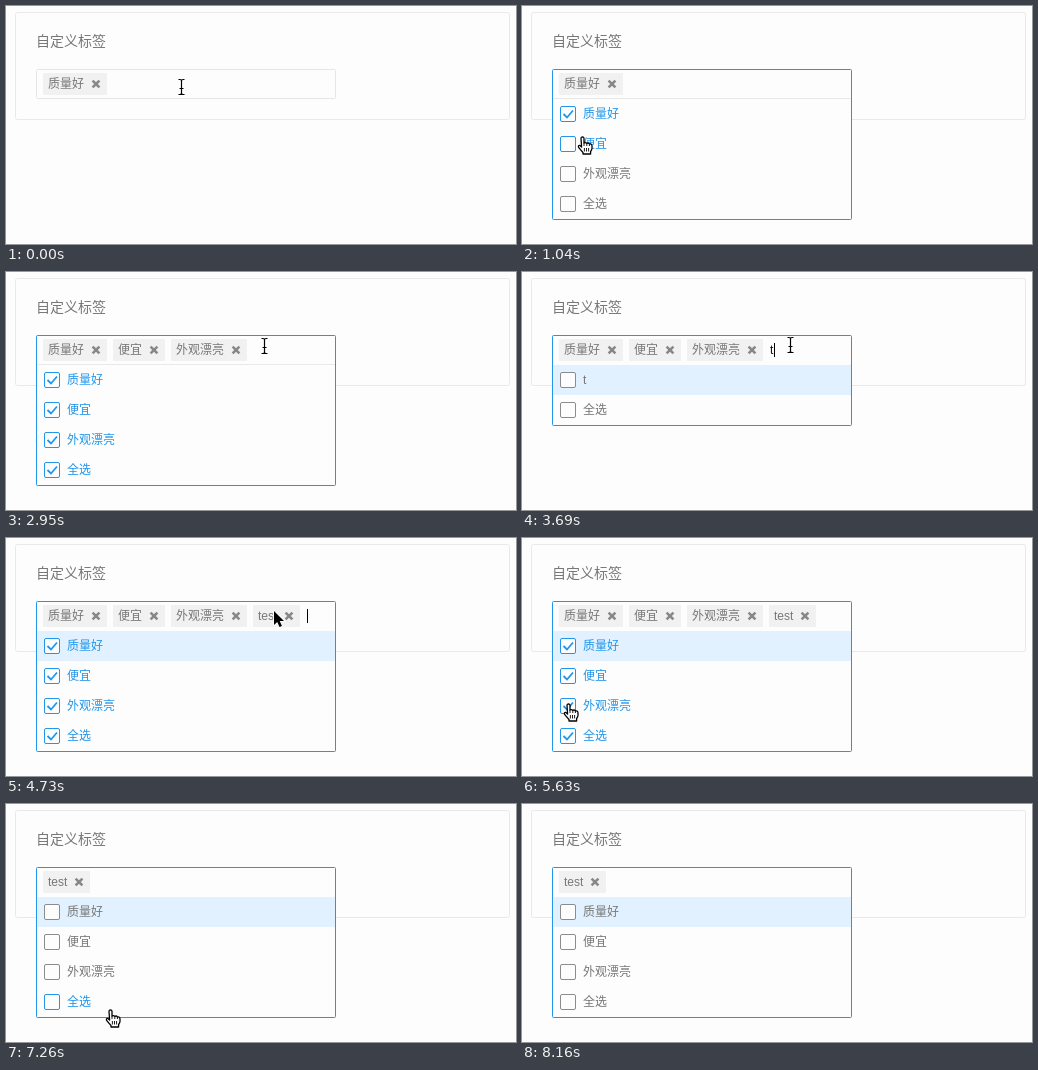
Recreate the animation shown at these times as an HTML page with a canvas. Size 510 by 238 pixels, loop 8460 ms.

```html
<!DOCTYPE html>
<html lang="zh">
<head>
<meta charset="utf-8">
<title>自定义标签</title>
<style>
  html, body { margin: 0; width: 100%; height: 100%; overflow: hidden; background: #fdfdfd; }
  canvas { display: block; }
</style>
</head>
<body>
<canvas id="stage" width="510" height="238"></canvas>
<script>
const ctx = document.getElementById('stage').getContext('2d');
const LOOP = 8460;
const BLUE = '#2196ea', GREY = '#777', PAGE = '#fdfdfd';
const FAMILY = '"Liberation Sans", "Noto Sans CJK SC", "Noto Sans CJK", sans-serif';
const OPTIONS = ['质量好', '便宜', '外观漂亮'];
const ALL = '全选';

// Each track holds [time, ...values]; a value stays until the next entry.
const CURSOR = [
  [0, 'beam', 175, 81],
  [600, 'hand', 152, 97], [740, 'hand', 112, 114], [890, 'hand', 76, 127],
  [1040, 'hand', 61, 131], [1180, 'hand', 54, 133], [1330, 'hand', 52, 134],
  [1780, 'hand', 54, 146], [1930, 'hand', 58, 162], [2070, 'hand', 60, 169],
  [2220, 'hand', 56, 169], [2370, 'hand', 68, 158], [2520, 'hand', 150, 115],
  [2660, 'beam', 244, 76], [2810, 'beam', 258, 74], [2960, 'beam', 265, 73],
  [3100, 'beam', 268, 73],
  [4730, 'arrow', 268, 73],
  [5330, 'hand', 180, 112], [5480, 'hand', 85, 148], [5630, 'hand', 47, 166],
  [5780, 'hand', 42, 182], [5930, 'hand', 41, 194], [6070, 'hand', 43, 198],
  [6220, 'hand', 44, 197],
  [6970, 'hand', 58, 199], [7120, 'hand', 105, 206], [7270, 'arrow', 190, 216],
  [7420, 'arrow', 280, 222], [7560, 'arrow', 360, 227], [7710, 'arrow', 420, 231],
  [7860, 'arrow', 452, 235], [8010, 'none', 0, 0]
];
const TAGS = [
  [0, ['质量好']],
  [1630, ['质量好', '便宜']],
  [2220, OPTIONS],
  [4730, [...OPTIONS, 'test']],
  [6670, ['test']]
];
const TYPED = [[0, ''], [3690, 't'], [3840, 'te'], [3990, 'tes'], [4280, 'test'], [4730, '']];
const CARET = [
  [0, false], [450, true], [890, false], [1330, true], [2070, false], [2220, true],
  [2810, false], [3250, true], [5330, false], [5780, true], [6220, false],
  [6670, true], [7120, false], [7710, true], [8160, false]
];

const HAND = new Path2D('M-2 1.5Q-2 0 -.5 0Q1 0 1 1.5V6Q2.6 5 3.8 6.4Q5.4 5.4 6.4 7Q9 6.4 9 9V11.5Q8.8 13 7.6 14.5V17H0V15.5Q-1.5 14 -4.4 10.4Q-5 8.3 -3.4 8.3Q-2.6 8.8 -1.4 10Z');
const HAND_LINES = new Path2D('M1.4 11V14.5M3.5 11V14.5M5.6 11V14.5M1 6V9M3.8 6.8V9M6.4 7.2V9');
const BEAM = new Path2D('M-3 -7.5H-1.5Q0 -7.5 0 -6V6Q0 7.5 -1.5 7.5H-3M3 -7.5H1.5Q0 -7.5 0 -6M0 6Q0 7.5 1.5 7.5H3M-2 1.5H2');
const ARROW = new Path2D('M0 0V14L3.2 11L5.5 16L8 15L5.7 10H10Z');

const at = (track, t) => track.findLast(entry => entry[0] <= t).slice(1);

function label(str, x, baseline, color, size = 12) {
  ctx.font = `${size}px ${FAMILY}`;
  ctx.fillStyle = color;
  ctx.fillText(str, x, baseline);
}

function textWidth(str) {
  ctx.font = `12px ${FAMILY}`;
  return Math.ceil(ctx.measureText(str).width);
}

function rounded(x, y, w, h, r, stroke, fill) {
  ctx.beginPath();
  ctx.roundRect(x, y, w, h, r);
  if (fill) { ctx.fillStyle = fill; ctx.fill(); }
  if (stroke) { ctx.strokeStyle = stroke; ctx.lineWidth = 1; ctx.stroke(); }
}

function line(color, width, ...points) {
  ctx.beginPath();
  points.forEach(([x, y]) => ctx.lineTo(x, y));
  ctx.strokeStyle = color;
  ctx.lineWidth = width;
  ctx.stroke();
}

function drawTag(name, x) {
  const w = textWidth(name) + 27, cx = x + w - 11;
  rounded(x, 67, w, 22, 1, null, '#f1f1f1');
  label(name, x + 5, 82, GREY);
  line('#888', 2.6, [cx - 3.4, 74.6], [cx + 3.4, 81.4]);
  line('#888', 2.6, [cx + 3.4, 74.6], [cx - 3.4, 81.4]);
  return x + w + 6;
}

function drawRow(name, index, checked, hovered) {
  const y = 93 + index * 30;
  const active = checked || hovered;
  rounded(38.5, y + 7.5, 15, 15, 1.5, active ? BLUE : '#8c8c8c', PAGE);
  if (checked) line(BLUE, 1.8, [41.5, y + 15], [45, y + 18.5], [51, y + 11.5]);
  label(name, 61, y + 19, active ? BLUE : GREY);
}

function drawCursor(kind, x, y) {
  ctx.save();
  ctx.translate(x, y);
  ctx.lineJoin = 'round';
  ctx.strokeStyle = '#000';
  if (kind === 'beam') {
    ctx.translate(0.5, 0);
    ctx.strokeStyle = '#fff';
    ctx.lineWidth = 2.4;
    ctx.stroke(BEAM);
    ctx.strokeStyle = '#000';
    ctx.lineWidth = 1.2;
    ctx.stroke(BEAM);
  } else if (kind === 'hand') {
    ctx.fillStyle = '#fff';
    ctx.fill(HAND);
    ctx.lineWidth = 1.3;
    ctx.stroke(HAND);
    ctx.lineWidth = 0.9;
    ctx.stroke(HAND_LINES);
  } else if (kind === 'arrow') {
    ctx.strokeStyle = '#fff';
    ctx.lineWidth = 1.5;
    ctx.stroke(ARROW);
    ctx.fillStyle = '#000';
    ctx.fill(ARROW);
  }
  ctx.restore();
}

function draw(t) {
  const [kind, mx, my] = at(CURSOR, t);
  const [tags] = at(TAGS, t);
  const [typed] = at(TYPED, t);
  const [caretOn] = at(CARET, t);
  const open = t >= 450;
  const rows = typed ? [typed, ALL] : [...OPTIONS, ALL];
  const bottom = 93 + rows.length * 30;
  const allChecked = OPTIONS.every(o => tags.includes(o));
  const hoverRow = kind === 'hand' ? Math.floor((my - 93) / 30) : -1;

  ctx.fillStyle = PAGE;
  ctx.fillRect(0, 0, 510, 238);
  rounded(9.5, 6.5, 494, 107, 2, '#e9e9e9');
  label('自定义标签', 30, 40, GREY, 14);

  if (open) {
    rounded(30.5, 63.5, 299, bottom - 63, 1, null, PAGE);
    if (t >= 3690) {
      ctx.fillStyle = '#e1f1ff';
      ctx.fillRect(31, 93, 298, 30);
    } else {
      line('#e9e9e9', 1, [31, 92.5], [329, 92.5]);
    }
    rows.forEach((name, i) => {
      const checked = !typed && (name === ALL ? allChecked : tags.includes(name));
      drawRow(name, i, checked, i === hoverRow);
    });
    rounded(30.5, 63.5, 299, bottom - 63, 1, BLUE);
  } else {
    rounded(30.5, 63.5, 299, 29, 1, '#e6e6e6');
  }

  const inputX = tags.reduce((x, name) => drawTag(name, x), 37) + 1;
  label(typed, inputX, 82, '#111');
  if (caretOn) {
    ctx.fillStyle = '#000';
    ctx.fillRect(inputX + textWidth(typed), 71, 1, 14);
  }
  drawCursor(kind, mx, my);
}

const start = performance.now();
function tick() {
  draw((performance.now() - start) % LOOP);
  requestAnimationFrame(tick);
}
tick();
</script>
</body>
</html>
```
